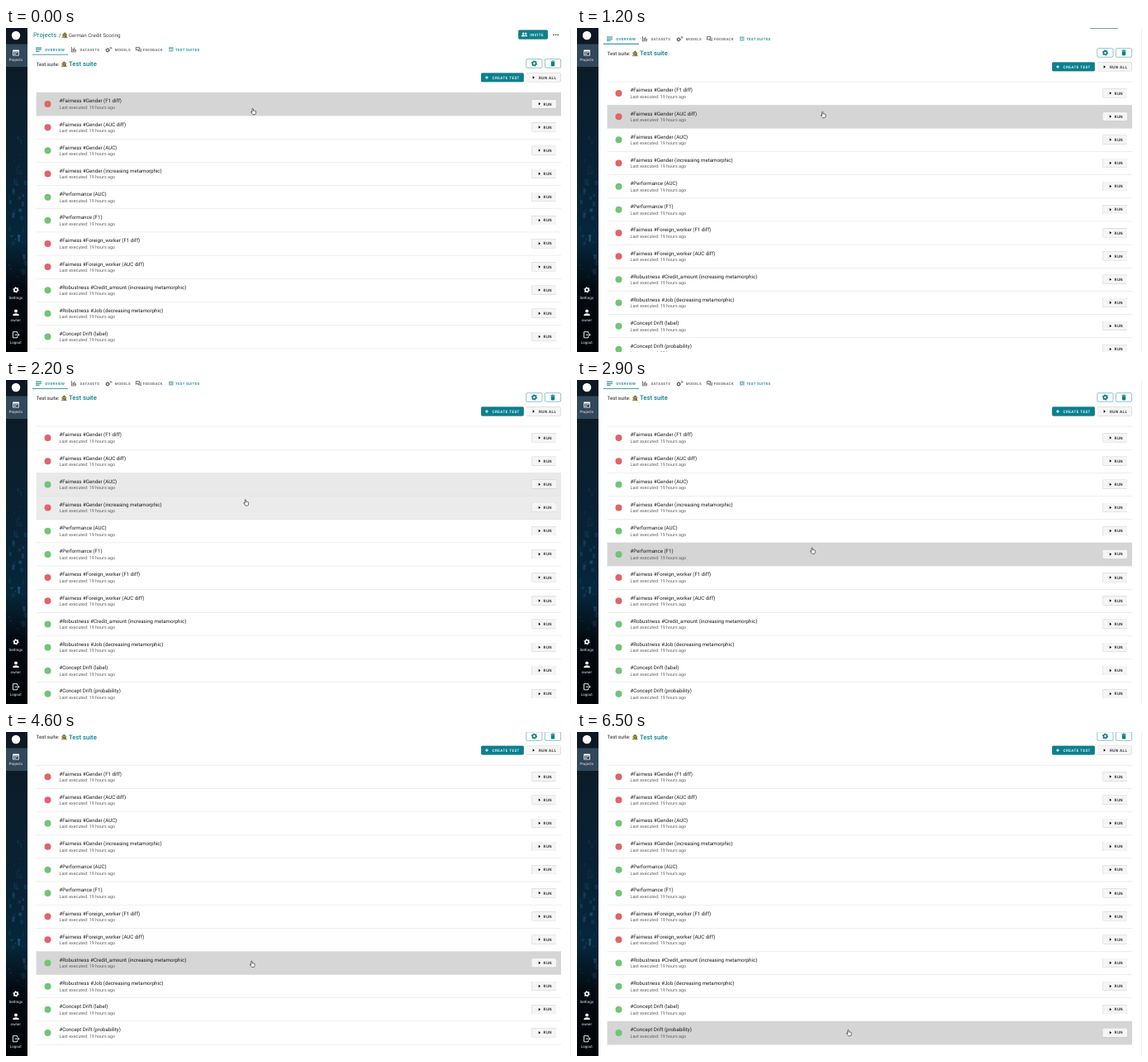
Write an HTML page that moves like this. It is 684 by 392 pixels and loops after 6.8 s.

```html
<!DOCTYPE html>
<html lang="en">
<head>
<meta charset="utf-8">
<title>Test suite</title>
<style>
  html, body { margin: 0; width: 100%; height: 100%; overflow: hidden; background: #fff; }
  svg { display: block; }
  text { font-family: Roboto, sans-serif; text-rendering: geometricPrecision; fill: #1c1c1c; white-space: pre; }
  .teal { fill: #0b7f8e; }
  .title { font-size: 6.17px; }
  .sub { font-size: 5.4px; fill: #626262; }
  .label { font-size: 4.63px; font-weight: 500; letter-spacing: .0893em; }
  .tab { font-size: 4.35px; font-weight: 500; letter-spacing: .08em; fill: #606060; }
  .tab.teal { fill: #0b7f8e; }
  .big { font-size: 7.7px; }
  .white { fill: #fff; }
  .nav { font-size: 4.5px; fill: #e8ecef; text-anchor: middle; }
  .raised { filter: drop-shadow(0 .5px .6px rgba(0, 0, 0, .4)); }
  .grey { fill: #f5f5f5; }
  .outline { fill: #fff; stroke: #0b7f8e; stroke-width: .45; }
  .line { fill: none; stroke-width: .9; }
</style>
</head>
<body>
<svg width="684" height="392" viewBox="0 0 684 392">
  <defs>
    <linearGradient id="night" x2="0" y2="1">
      <stop offset="0" stop-color="#0d1722"/>
      <stop offset=".2" stop-color="#0b1e2c"/>
      <stop offset=".5" stop-color="#082336"/>
      <stop offset=".66" stop-color="#06263b"/>
      <stop offset=".8" stop-color="#030a11"/>
      <stop offset="1" stop-color="#010305"/>
    </linearGradient>
    <g id="house">
      <path d="M0 3.4 3.5 0 7 3.4z" fill="#8a713f"/>
      <path d="M.8 3h5.4v3.6H.8z" fill="#c7a64e"/>
      <path d="M1.7 3.6h1.4V5H1.7zM4 3.6h1.3v3H4z" fill="#4f4a38"/>
      <path d="M0 6h7v.9H0z" fill="#78934b"/>
    </g>
    <g id="gear">
      <circle r="2.1" fill="none" stroke="currentColor" stroke-width="1.6"/>
      <circle r="3.1" fill="none" stroke="currentColor" stroke-width="1.1" stroke-dasharray="1.35 1.896"/>
    </g>
    <path id="play" d="M0-1.7 2.3 0 0 1.7z"/>
  </defs>

  <g id="page">
    <text class="big teal" x="33" y="11.2">Projects</text>
    <text class="title" x="64" y="10.8">/</text>
    <use href="#house" x="67.6" y="5"/>
    <text x="75.7" y="10.8" font-size="6.25" style="fill:#444">German Credit Scoring</text>

    <g class="raised"><rect class="teal" x="620.3" y="2.6" width="35.6" height="10.8" rx="1.4"/></g>
    <g class="white">
      <circle cx="626.2" cy="6.7" r="1.2"/><circle cx="629.2" cy="6.7" r="1.2"/>
      <path d="M623.7 10.3q0-2 2.5-2t2.5 2zM629.1 10.3q0-1.4-.6-2 2.7-.2 2.7 2z"/>
    </g>
    <text class="label white" x="634.2" y="9.7">INVITE</text>
    <g fill="#222"><circle cx="663" cy="8.2" r=".8"/><circle cx="665.6" cy="8.2" r=".8"/><circle cx="668.2" cy="8.2" r=".8"/></g>

    <g class="teal">
      <path d="M36 23.5h7v1h-7zM36 25.6h7v1h-7zM36 27.7h4.6v1H36z"/>
      <path d="M32 31.8h43v.8H32z"/>
      <path d="M197 23.6h5.6v.8H197zM197 25.5h2.2v.8H197zM200 25.5h2.6v.8H200zM197 27.4h5.6v.8H197z"/>
    </g>
    <g fill="#606060" color="#606060">
      <path d="M79 23h.8v5.4H85v.8h-6zM80.7 25h1v3h-1zM82.3 23.6h1v4.4h-1zM83.9 26h1v2h-1z"/>
      <use href="#gear" transform="translate(123 26.8) scale(.75)"/>
      <use href="#gear" transform="translate(126.9 24.3) scale(.4)"/>
    </g>
    <path class="line" stroke="#606060" d="M157.4 27.2v-3.8h4.2v2.7h-2.8zM159.3 27.6h2.8l1 1v-3.9"/>
    <text class="tab teal" x="47.2" y="27.7">OVERVIEW</text>
    <text class="tab" x="89.4" y="27.7">DATASETS</text>
    <text class="tab" x="131.8" y="27.7">MODELS</text>
    <text class="tab" x="165.8" y="27.7">FEEDBACK</text>
    <text class="tab teal" x="205" y="27.7">TEST SUITES</text>

    <text x="36.8" y="46.1" font-size="6">Test suite:</text>
    <use href="#house" x="66.8" y="40.2"/>
    <text class="big teal" x="76" y="46.4" font-weight="500">Test suite</text>

    <rect class="outline" x="629.8" y="37.6" width="19.2" height="10.6" rx="1.4"/>
    <rect class="outline" x="652.4" y="37.6" width="19.2" height="10.6" rx="1.4"/>
    <use href="#gear" x="639.5" y="42.9" color="#0b7f8e"/>
    <path class="teal" d="M659.4 39.8h1.6l.4-.5h1.2l.4.5h1.6v.8h-5.2zM659.8 41.1h4.4v4.4q0 .8-.8.8h-2.8q-.8 0-.8-.8z"/>

    <g class="raised">
      <rect class="teal" x="575.2" y="54.5" width="51.6" height="10.8" rx="1.4"/>
      <rect class="grey" x="630" y="54.5" width="41.6" height="10.8" rx="1.4"/>
    </g>
    <path class="line" stroke="#fff" stroke-width=".7" d="M580 59.9h4M582 57.9v4"/>
    <text class="label white" x="588.5" y="61.6">CREATE TEST</text>
    <use href="#play" x="637.7" y="59.9"/>
    <text class="label" x="645" y="61.6">RUN ALL</text>

    <g id="rows"></g>
  </g>
  <path d="M683.2 0h.5v392h-.5z" fill="#e6e6e6"/>

  <g id="sidebar">
    <rect width="26" height="392" fill="url(#night)"/>
    <g id="lights"></g>
    <rect y="19.5" width="26" height="27.5" fill="#31485a"/>
    <circle class="white" cx="12" cy="9" r="5.2"/>
    <g class="white">
      <path fill-rule="evenodd" d="M8.2 26.4h7.6v7.2H8.2zM9 28.5v4.3h6v-4.3zM9.8 29.3h1.8v1H9.8zM12.4 29.3h1.8v1h-1.8zM9.8 31h1.8v1H9.8z"/>
      <circle cx="12" cy="342.4" r="1.9"/>
      <path d="M8.2 348q0-2.8 3.8-2.8t3.8 2.8z"/>
    </g>
    <use href="#gear" x="12" y="316.8" color="#fff"/>
    <path class="line" stroke="#fff" d="M13.6 369.4v-1.8H8.4v7.2h5.2V373M10.6 371.2h5.4M14.4 369.5l1.7 1.7-1.7 1.7"/>
    <text class="nav" x="11.8" y="40">Projects</text>
    <text class="nav" x="11.8" y="327.7">Settings</text>
    <text class="nav" x="11.8" y="355">owner</text>
    <text class="nav" x="11.8" y="382.3">Logout</text>
  </g>

  <path id="cursor" fill="#fff" stroke="#222" stroke-width=".65" stroke-linejoin="round"
    d="M-1.7 1V-2.7q0-.9.7-.9t.7.9V-.8q.6-.5 1.1 0 .6-.4 1 .1.9-.2.9.8V1.6Q2.7 3.6 1.6 3.8H-.8Q-1.8 2.9-2.9 1 -3.1.1-2.4.2z"/>
</svg>
<script>
  const LOOP = 6800, STEP = 100, FADE = 300, PITCH = 28.16, TOP = 78;
  const el = id => document.getElementById(id);

  const tests = [
    ['#Fairness #Gender (F1 diff)', false],
    ['#Fairness #Gender (AUC diff)', false],
    ['#Fairness #Gender (AUC)', true],
    ['#Fairness #Gender (increasing metamorphic)', false],
    ['#Performance (AUC)', true],
    ['#Performance (F1)', true],
    ['#Fairness #Foreign_worker (F1 diff)', false],
    ['#Fairness #Foreign_worker (AUC diff)', false],
    ['#Robustness #Credit_amount (increasing metamorphic)', true],
    ['#Robustness #Job (decreasing metamorphic)', true],
    ['#Concept Drift (label)', true],
    ['#Concept Drift (probability)', true],
  ];

  // Time at which the pointer enters each row.
  const enter = [-FADE, 480, 1720, 2140, 2445, 2660, 3250, 3980, 4400, 4850, 5520, 5900];
  // [time, offset]
  const scroll = [[0, 0], [100, 1.5], [300, 6], [480, 8.2], [600, 8.8], [700, 8.9], [1000, 8.9],
    [1400, 17], [1700, 20.8], [2000, 21.9], [3000, 21.9], [3250, 37], [3600, 37.8]];
  // [time, x, y]
  const pointer = [[0, 299.7, 101], [1000, 299.5, 101], [1700, 295.3, 114.6], [2300, 290, 155],
    [2700, 286, 202], [2900, 285.6, 206.5], [3200, 286, 212], [3600, 287, 213.7], [3900, 290, 232],
    [4400, 296, 268.5], [4900, 302, 299], [5500, 311, 324.6], [5800, 317, 347],
    [6200, 325, 360], [6500, 329.4, 364]];

  el('rows').innerHTML = tests.map(([name, passed], i) => `
    <g transform="translate(0 ${TOP + i * PITCH})">
      <rect class="hover" x="36.6" width="635.4" height="${PITCH}" fill="#d5d5d5"/>
      <rect x="36.6" y="-.25" width="635.4" height=".45" fill="#d8d8d8"/>
      <circle cx="50.5" cy="14" r="4" fill="${passed ? '#72c477' : '#e26465'}"/>
      <text class="title" x="64.5" y="12.4">${name}</text>
      <text class="sub" x="64.5" y="19.9">Last executed: 19 hours ago</text>
      <g class="raised"><rect class="grey" x="636.2" y="8.4" width="29.8" height="10.8" rx="1.4"/></g>
      <use href="#play" x="644.8" y="13.8"/>
      <text class="label" x="650.6" y="15.5">RUN</text>
    </g>`).join('') +
    `<rect x="36.6" y="${TOP + tests.length * PITCH}" width="635.4" height=".45" fill="#d8d8d8"/>`;
  const hovers = [...document.querySelectorAll('.hover')];

  // Loose skyline: dim bars with a brighter band in the middle.
  let seed = 7;
  const random = () => (seed = seed * 16807 % 2147483647) / 2147483647;
  el('lights').innerHTML = Array.from({ length: 46 }, () => {
    const y = 130 + random() * 175, glow = Math.exp(-(((y - 235) / 45) ** 2));
    return `<rect x="${random() * 22}" y="${y}" width="${1 + random() * 3}" height="${1 + random() * 7}"
      fill="#2a7ba6" opacity="${.1 + .4 * glow * random()}"/>`;
  }).join('');

  const clamp = v => Math.min(1, Math.max(0, v));
  const fade = (t, start) => 1 - (1 - clamp((t - start) / FADE)) ** 3;

  function track(keys, t) {
    const next = keys.findIndex(k => k[0] > t);
    if (next < 0) return keys[keys.length - 1].slice(1);
    const a = keys[next - 1], b = keys[next], u = (t - a[0]) / (b[0] - a[0]);
    return a.slice(1).map((v, i) => v + (b[i + 1] - v) * u);
  }

  function draw(now) {
    const t = Math.floor(now % LOOP / STEP) * STEP;
    const [offset] = track(scroll, t), [x, y] = track(pointer, t);
    el('page').setAttribute('transform', `translate(0 ${-offset})`);
    el('cursor').setAttribute('transform', `translate(${x} ${y})`);
    hovers.forEach((rect, i) => {
      const leave = enter[i + 1] ?? Infinity;
      rect.setAttribute('opacity', fade(t, enter[i]) * (1 - fade(t, leave)));
    });
  }

  const begin = performance.now();
  function tick() {
    draw(performance.now() - begin);
    requestAnimationFrame(tick);
  }
  tick();
</script>
</body>
</html>
```
